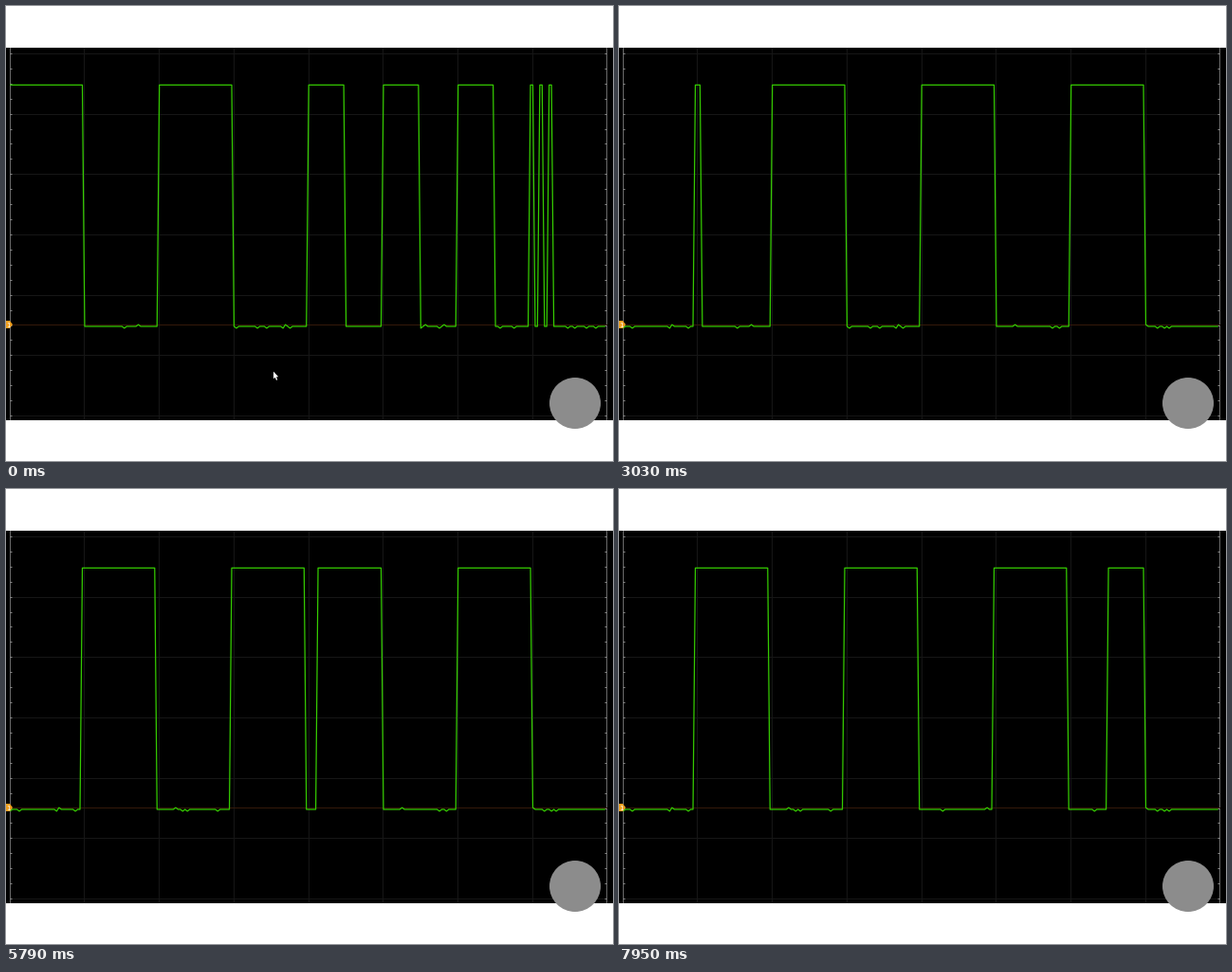
Recreate the animation shown at these times as a matplotlib script. Size 640x480 px, loop 8 s.

```python
import numpy as np
import matplotlib.pyplot as plt
from matplotlib.animation import FuncAnimation
from matplotlib.patches import Circle, Polygon, Rectangle

W, H, DPI = 640, 480, 100
LOOP, STEP = 8000, 20
PX = 72 / DPI                     # one pixel in points
LEFT, RIGHT = 4, 634
DIV_X, DIV_Y = (RIGHT - LEFT) / 8, 63.7
TOP, BASE, RIPPLE = 83.3, 338.0, 1.9
SAMPLES = 256
RATE, REFRESH = 2.1265, 60        # samples written per screen refresh

k = np.arange(SAMPLES)
xs = LEFT + 0.2 + k * (RIGHT - LEFT) / SAMPLES


def wave(high, seed):
    """Two-level signal with sparse random ripples on the low level."""
    r = np.random.default_rng(seed).random(SAMPLES)
    ripple = RIPPLE * ((r < 0.1).astype(float) - (r > 0.97))
    return np.where(high, TOP, BASE + ripple)


wide = (k >= 128) & (k < 208) & (k % 32 < 16)
narrow = (k >= 223) & (k < 233) & ((k - 223) % 4 < 2)
mixed = wave(wide | narrow, 1)
even = wave(k // 32 % 2 == 0, 2)
shifted = wave((k + 1) // 32 % 2 == 1, 3)


def written(t, t0, start):
    """Number of samples the sweep has replaced at time t."""
    return int(start + RATE * ((t - t0) // REFRESH))


def signal(t):
    if t >= 2070:
        return np.where(k < max(1, written(t, 2370, 11.22)), shifted, even)
    if t < 60:
        m = 122
    elif t < 260:
        m = 224
    else:
        m = written(t, 690, 242.1)
    return np.where(k < m, even, mixed)


fig = plt.figure(figsize=(W / DPI, H / DPI), dpi=DPI, facecolor="white")
ax = fig.add_axes([0, 0, 1, 1])
ax.set_xlim(0, W)
ax.set_ylim(H, 0)
ax.axis("off")


def line(x, y, color, width=1.0, **kw):
    return ax.plot(x, y, color=color, lw=width * PX, snap=False,
                   solid_capstyle="butt", **kw)[0]


def center(v):
    """Middle of the pixel that holds v."""
    return np.floor(v) + 0.5


# Screen, grid and scale ticks
ax.add_patch(Rectangle((0, 44), W, 393, fc="black", lw=0))
for i in range(7):
    x, y = center(LEFT + DIV_X * (i + 1)), center(50.4 + DIV_Y * i)
    line([x, x], [44, 437], "#161616")
    line([LEFT, RIGHT], [y, y], "#161616")
for x, side in ((LEFT + 0.5, 1), (RIGHT - 0.5, -1)):
    line([x, x], [44, 437], "#6a6a6a")
    for i in range(25):
        y = center(50.4 + DIV_Y / 4 * i)
        line([x, x + 2 * side], [y, y], "#8a8a8a")
line([LEFT, RIGHT], [336.5, 336.5], "#34190a")

trace = line(xs, even, "#35cc00", 1.25, solid_joinstyle="round", zorder=4)

# Channel marker
ax.add_patch(Polygon([(0, 332), (4, 332), (7, 336), (4, 340), (0, 340)],
                     fc="#f0a020", lw=0, zorder=5))
ax.text(2.3, 336.2, "1", color="white", fontsize=7 * PX, ha="center",
        va="center_baseline", family="DejaVu Sans", zorder=6)

ax.add_patch(Circle((600, 419), 27, fc="#8c8c8c", lw=0, zorder=5))

ARROW = np.array([(0, 0), (0, 7.6), (1.7, 6.2), (3, 9.2),
                  (4.2, 8.7), (3, 5.8), (5.2, 5.6)])
cursor = ax.add_patch(Polygon(ARROW, fc="white", lw=0, zorder=7))


def draw(i):
    t = i * STEP + STEP // 2
    trace.set_ydata(signal(t))
    cursor.set_xy(ARROW + ((282, 385.6) if t < 1680 else (278, 384.8)))
    cursor.set_visible(t < 1940)
    return trace, cursor


anim = FuncAnimation(fig, draw, frames=LOOP // STEP, interval=STEP,
                     repeat=True, repeat_delay=0, blit=False)
plt.show()
```
